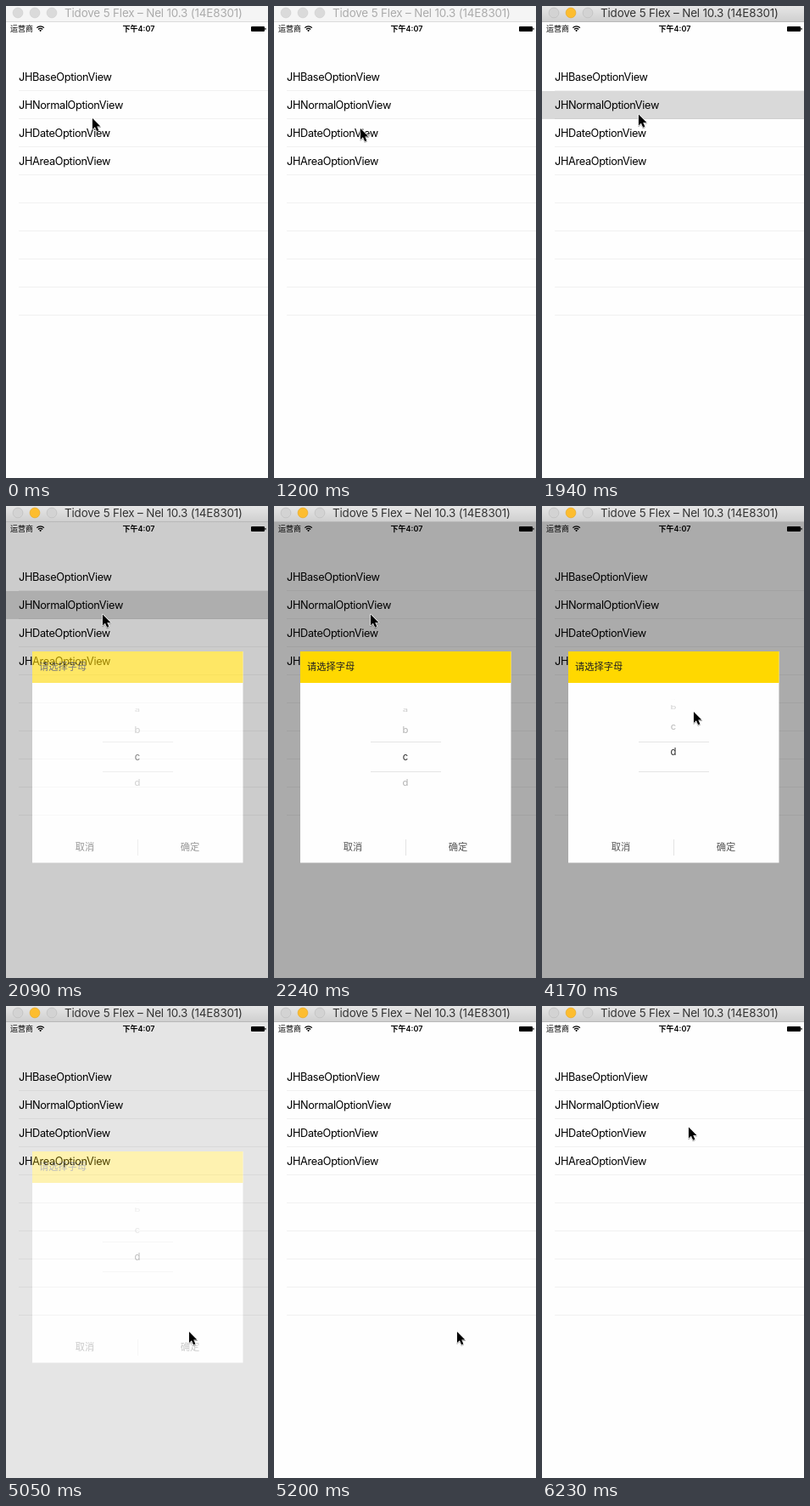
These frames come from a looping animation (309x555 px, 8000 ms). An HTML page:

```html
<!DOCTYPE html>
<html lang="zh-CN">
<head>
<meta charset="utf-8">
<title>Option view</title>
<style>
  html, body { margin: 0; width: 100%; height: 100%; overflow: hidden; background: #fefefe; }
  svg { display: block; width: 309px; height: 555px; }
  text { font-family: Inter, "Noto Sans CJK SC", "Noto Sans CJK", sans-serif; }
  .row { font-size: 12.75px; letter-spacing: -.35px; }
  .status { font-size: 9px; }
  .dialog { font-size: 11.25px; }
  .mid { text-anchor: middle; }
  #cursor { filter: drop-shadow(0 1px .8px rgba(0, 0, 0, .35)); }
</style>
</head>
<body>
<svg viewBox="0 0 309 555">
  <defs>
    <linearGradient id="chrome" x2="0" y2="1">
      <stop stop-color="#e6e6e6"/><stop offset="1" stop-color="#cfcfcf"/>
    </linearGradient>
  </defs>
  <rect width="309" height="555" fill="#fefefe"/>

  <g id="list">
    <rect id="highlight" y="100" width="309" height="33" fill="#d9d9d9"/>
  </g>

  <g class="status">
    <text x="5" y="30">运营商</text>
    <text x="156.5" y="30" class="mid" font-weight="600">下午4:07</text>
    <path d="M36.3 25.6a6 6 0 0 1 8.6 0M38 27.5a3.6 3.6 0 0 1 5.2 0" fill="none" stroke="#000" stroke-width="1.2"/>
    <path d="M40.6 30.3l-1.4-1.6a2 2 0 0 1 2.8 0z"/>
    <rect x="289" y="24" width="16" height="6" rx="1"/>
    <rect x="305.5" y="25.8" width="1" height="2.4" rx=".5"/>
  </g>

  <g id="popup">
    <rect y="19" width="309" height="536" fill="#000" opacity=".33"/>
    <rect x="31" y="171" width="248.5" height="248.5" fill="#fefefe"/>
    <rect x="31" y="171" width="248.5" height="37" fill="#ffd800"/>
    <g class="dialog">
      <text x="39" y="193.3" fill="#222">请选择字母</text>
      <g id="wheel" class="mid"></g>
      <g class="mid" fill="#555">
        <text x="93" y="405.3">取消</text>
        <text x="217" y="405.3">确定</text>
      </g>
    </g>
    <path d="M114 277.5h83M114 312.5h83M155.5 392v19" stroke="#e4e4e4"/>
  </g>

  <rect id="bar" width="309" height="18.5"/>
  <path id="edge" d="M0 18.5h309"/>
  <g id="lights" stroke-width=".7"></g>
  <text id="title" x="69" y="13" font-size="13.4" letter-spacing="-.15">Tidove 5 Flex – Nel 10.3 (14E8301)</text>

  <path id="cursor" d="M0 0V14.2L3.2 11.2L5.6 16.5L8 15.4L5.7 10.3H10.2Z"
        stroke="#fff" stroke-width="1.4" paint-order="stroke" stroke-linejoin="round"/>
</svg>
<script>
const LOOP = 8000, TICK = 148.3; // the picture changes only on whole ticks
const $ = id => document.getElementById(id);
const set = (el, attrs) => { for (const k in attrs) el.setAttribute(k, attrs[k]); };
const add = (parent, tag, attrs, text = '') => {
  const el = document.createElementNS('http://www.w3.org/2000/svg', tag);
  set(el, attrs);
  el.textContent = text;
  parent.append(el);
  return el;
};
const clamp = v => Math.min(1, Math.max(0, v));
const smooth = u => u * u * (3 - 2 * u);

for (let i = 0; i < 9; i++) {
  add($('list'), 'path', { d: `M15 ${99.5 + i * 33}h294`, stroke: '#000', 'stroke-opacity': .05 });
}
['Base', 'Normal', 'Date', 'Area'].forEach((name, i) =>
  add($('list'), 'text', { class: 'row', x: 15, y: 88 + i * 33 }, `JH${name}OptionView`));

const lights = [14, 34, 54].map(cx => add($('lights'), 'circle', { cx, cy: 8, r: 5.9 }));
const letters = [...'abcd'].map(ch => add($('wheel'), 'text', {}, ch));

// Stops of the pointer: tick, x, y.
const stops = [
  [6, 102, 132], [8, 102, 144], [10, 114, 127.5],
  [17, 114, 127.5], [21, 150, 292], [23, 154, 345], [25, 158, 326],
  [28, 179, 242], [29, 183, 216], [32, 210, 394], [33, 216, 383],
  [35, 216, 383], [41, 173, 142.5]
];

function pointer(tick) {
  const next = stops.findIndex(stop => stop[0] > tick);
  const b = stops.at(next), a = next > 0 ? stops[next - 1] : b;
  const u = smooth(clamp((tick - a[0]) / (b[0] - a[0] || 1)));
  return [a[1] + (b[1] - a[1]) * u, a[2] + (b[2] - a[2]) * u];
}

const popupAlpha = tick => clamp((tick - 13) * .6) - clamp((tick - 33) * .7);

// The selection is dragged from c to d, overshoots and springs back.
const selected = tick =>
  2 + clamp((tick - 25) / 3) + .16 * Math.sin(Math.PI * clamp((tick - 26) / 4));

function drawWheel(pos) {
  const step = 27.5 * Math.PI / 180, radius = 67;
  letters.forEach((el, i) => {
    const angle = (i - pos) * step;
    const y = radius * Math.sin(angle), squash = Math.max(Math.cos(angle), .01);
    const chosen = Math.abs(y) < 17;
    set(el, {
      transform: `translate(155 ${295 + y}) scale(1 ${squash})`,
      y: 3.6,
      fill: chosen ? '#2a2a2a' : '#000',
      opacity: chosen ? 1 : .34 * squash
    });
  });
}

function draw(t) {
  const tick = Math.floor(t / TICK);
  const active = tick >= 13;
  const [x, y] = pointer(tick);

  set($('highlight'), { opacity: active && tick < 15 ? 1 : 0 });
  set($('popup'), { opacity: popupAlpha(tick) });
  drawWheel(selected(tick));

  set($('bar'), { fill: active ? 'url(#chrome)' : '#f5f5f5' });
  set($('edge'), { stroke: active ? '#b8b8b8' : '#dcdcdc' });
  set($('title'), { fill: active ? '#333' : '#ababab' });
  lights.forEach((el, i) => set(el, active && i === 1
    ? { fill: '#fdbd2f', stroke: '#e6a92c' }
    : { fill: active ? '#d3d3d3' : '#dadada', stroke: active ? '#bebebe' : '#d0d0d0' }));
  set($('cursor'), { transform: `translate(${x} ${y}) scale(.92)` });
}

const start = performance.now();
function frame() {
  draw((performance.now() - start) % LOOP);
  requestAnimationFrame(frame);
}
frame();
</script>
</body>
</html>
```
